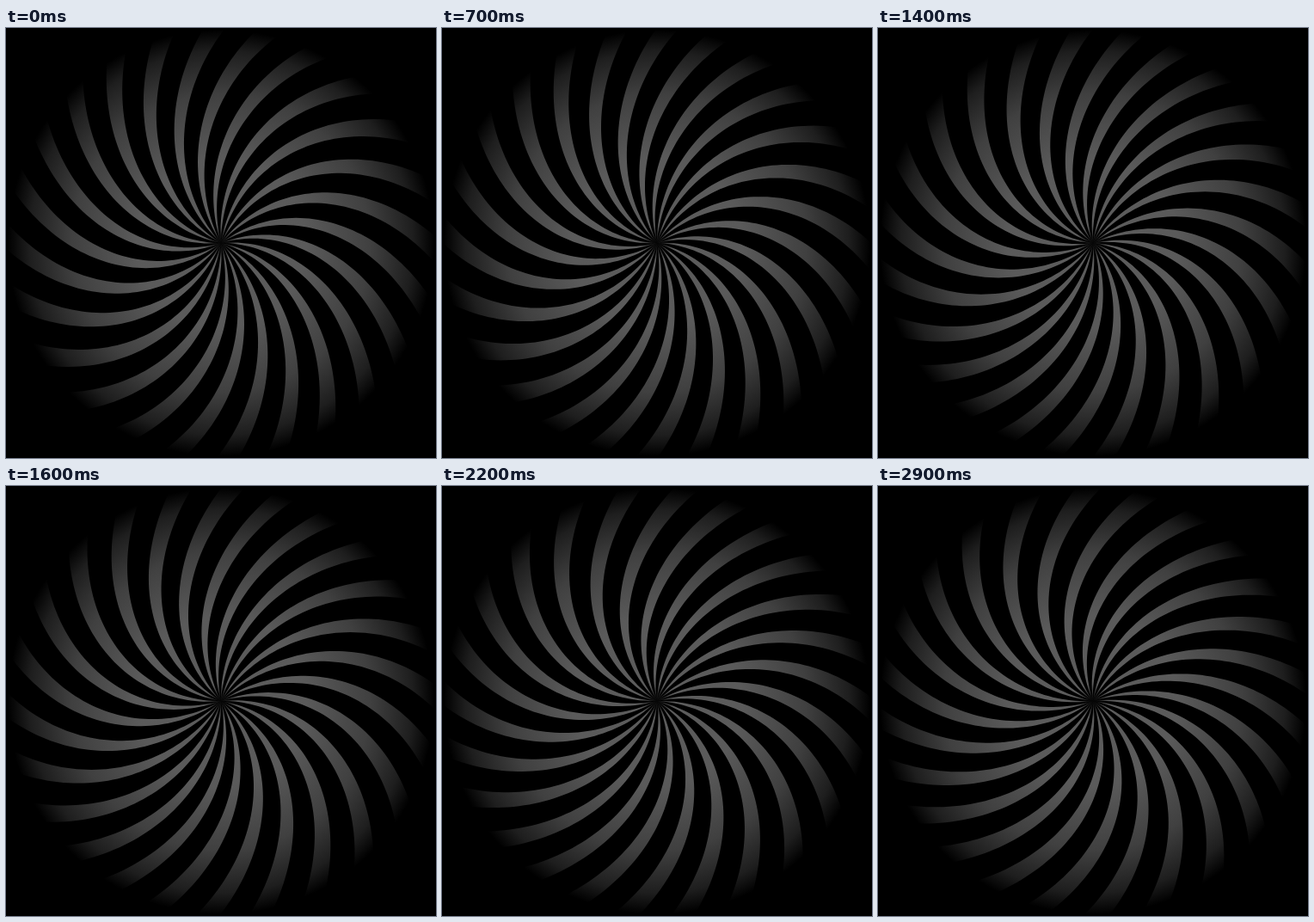
Animation, 500 px wide and 500 px high, one loop 3 s. Source, as an HTML page with a canvas:

```html
<!DOCTYPE html>
<html>
<head>
<meta charset="utf-8">
<style>
  html, body { margin: 0; height: 100%; overflow: hidden; background: #000; }
  canvas { display: block; }
</style>
</head>
<body>
<canvas id="stage" width="500" height="500"></canvas>
<script>
const ctx = document.getElementById('stage').getContext('2d');
const CENTER = 250, ARMS = 24, LOOP = 3000, STEP = 100;
const RAD = Math.PI / 180;
const TWIST = 0.0033;      // radians per pixel of radius
const START = 12.6 * RAD;

const glow = ctx.createRadialGradient(CENTER, CENTER, 0, CENTER, CENTER, 248);
glow.addColorStop(0, '#111');
glow.addColorStop(0.08, '#5c5c5c');
glow.addColorStop(0.4, '#5a5a5a');
glow.addColorStop(0.7, '#404040');
glow.addColorStop(0.9, '#1e1e1e');
glow.addColorStop(1, '#000');

function buildArms() {
  const path = new Path2D();
  const edgePoint = (arm, r, side) => {
    const halfWidth = 0.043 + 0.00005 * r;
    const a = START + arm * 2 * Math.PI / ARMS + TWIST * r + side * halfWidth;
    path.lineTo(r * Math.sin(a), -r * Math.cos(a));
  };
  for (let arm = 0; arm < ARMS; arm++) {
    path.moveTo(0, 0);
    for (let r = 5; r <= 275; r += 5) edgePoint(arm, r, -1);
    for (let r = 275; r > 0; r -= 5) edgePoint(arm, r, 1);
    path.closePath();
  }
  return path;
}

const arms = buildArms();

// Degrees: a nearly constant turn with a brief soft start
const turn = step => 3.14 * (step - 1.2 * (1 - Math.exp(-step / 1.5)));

function draw(now) {
  const step = Math.floor(now % LOOP / STEP);
  ctx.fillStyle = '#000';
  ctx.fillRect(0, 0, 500, 500);

  // The slightly tall spiral turns; the glow stays round
  const pose = new DOMMatrix()
    .translate(CENTER, CENTER)
    .rotate(turn(step))
    .scale(0.962, 1.039);
  const spiral = new Path2D();
  spiral.addPath(arms, pose);
  ctx.fillStyle = glow;
  ctx.fill(spiral);
  requestAnimationFrame(draw);
}
requestAnimationFrame(draw);
</script>
</body>
</html>
```
